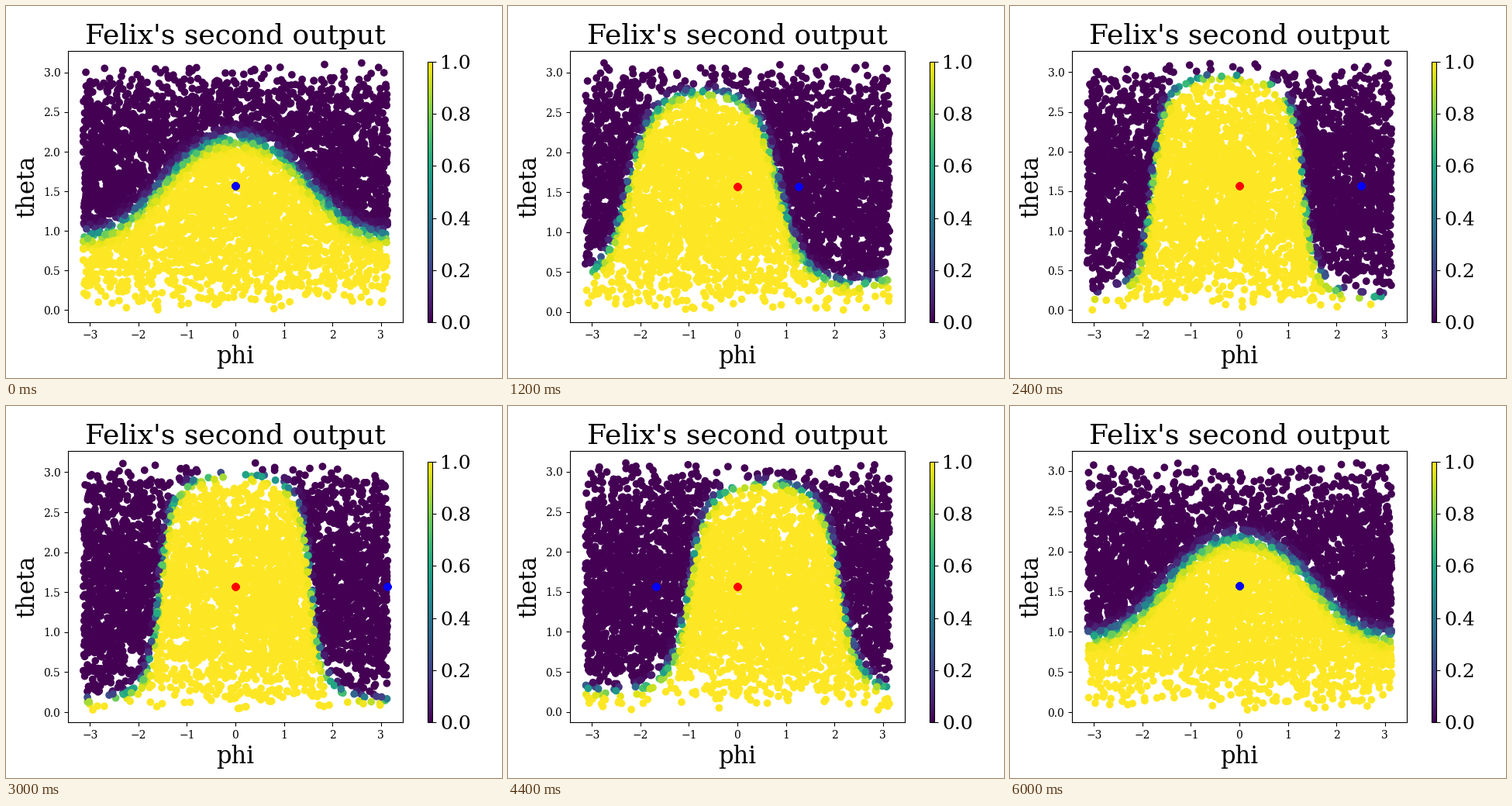
Write a matplotlib script that moves like this. It is 640x480 px and loops after 6200 ms.

```python
import numpy as np
import matplotlib.pyplot as plt
from matplotlib.animation import FuncAnimation
from matplotlib.cm import ScalarMappable

FRAMES, INTERVAL = 31, 200
POINTS = 4500
SHARPNESS = 22


def blue_angle(n):
    """One full turn over the loop, wrapped to (-pi, pi]."""
    turn = n / (FRAMES - 1)
    return 2 * np.pi * (turn if turn <= .5 else turn - 1)


def plane_normal(angle):
    """Normal of the plane that splits the sphere into the two outputs."""
    tilt = .7 + 2.7 * (1 - np.cos(angle))
    azimuth = np.arctan2(-.9 * np.sin(angle), 1.33 - np.cos(angle))
    return np.array([tilt * np.cos(azimuth), tilt * np.sin(azimuth), 1])


def sample(n):
    """Uniform points on the sphere and their output values."""
    rng = np.random.default_rng(n)
    phi = rng.uniform(-np.pi, np.pi, POINTS)
    theta = np.arccos(rng.uniform(-1, 1, POINTS))
    ring = np.sin(theta)
    points = np.array([ring * np.cos(phi), ring * np.sin(phi), np.cos(theta)])
    normal = plane_normal(blue_angle(n))
    logit = SHARPNESS * (normal @ points) / np.sqrt(np.linalg.norm(normal))
    return phi, theta, 1 / (1 + np.exp(-logit))


plt.rcParams["font.family"] = "DejaVu Serif"
fig, ax = plt.subplots(figsize=(6.4, 4.8), dpi=100)
fig.subplots_adjust(left=.125, right=.8, bottom=.15, top=.88)
ax.set_title("Felix's second output", fontsize=26)
ax.set_xlabel("phi", fontsize=22)
ax.set_ylabel("theta", fontsize=22)
ax.set_xlim(-1.1 * np.pi, 1.1 * np.pi)

cax = fig.add_axes([.85, .15, .01, .7])
fig.colorbar(ScalarMappable(plt.Normalize(0, 1), "viridis"), cax=cax)
cax.tick_params(labelsize=18)

# Stacked copies give the two settings crisp edges
equator = np.full(40, np.pi / 2)
cloud = ax.scatter(np.zeros(POINTS), np.zeros(POINTS), c=np.zeros(POINTS),
                   cmap="viridis", vmin=0, vmax=1)
ax.scatter(0 * equator, equator, color="red")
blue = ax.scatter(0 * equator, equator, color="blue")


def update(n):
    phi, theta, value = sample(n)
    cloud.set_offsets(np.column_stack([phi, theta]))
    cloud.set_array(value)
    blue.set_offsets(np.column_stack([0 * equator + blue_angle(n), equator]))
    pad = .05 * np.ptp(theta)
    ax.set_ylim(theta.min() - pad, theta.max() + pad)
    return cloud, blue


anim = FuncAnimation(fig, update, frames=FRAMES, interval=INTERVAL,
                     repeat=True, repeat_delay=0, blit=False)
plt.show()
```
